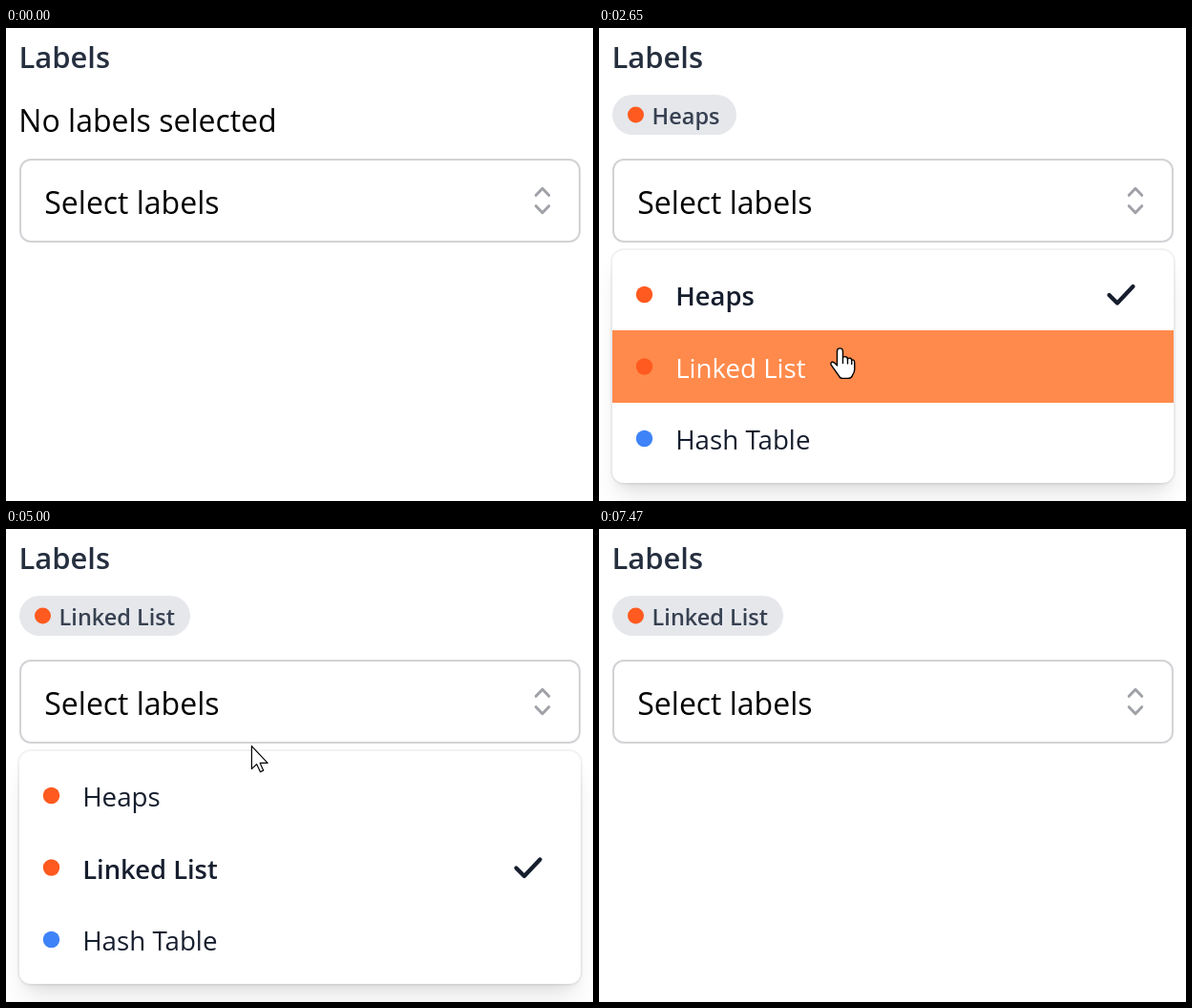
Animation of 615 by 496 pixels, one loop 8390 ms. Source, as an HTML page:

```html
<!DOCTYPE html>
<html lang="en">
<head>
<meta charset="utf-8">
<title>Label picker</title>
<style>
  html, body { margin: 0; width: 100%; height: 100%; overflow: hidden; background: #fff; }
  .box { position: absolute; left: 14px; width: 588px; box-sizing: border-box; background: #fff; border-radius: 12px; }
  #field { top: 137px; height: 88px; border: 2px solid #d2d3d6; }
  #menu {
    top: 233px; height: 244px;
    box-shadow: 0 0 0 2px rgba(0,0,0,.05), 0 19px 28px -6px rgba(0,0,0,.1), 0 8px 11px -4px rgba(0,0,0,.06);
  }
  svg { position: absolute; left: 0; top: 0; font-family: "Open Sans", "Noto Sans", sans-serif; }
  text { white-space: pre; }
</style>
</head>
<body>
<div class="box" id="field"></div>
<div class="box" id="menu"></div>
<svg id="stage" width="615" height="496" viewBox="0 0 615 496"></svg>
<script>
const LOOP = 8390, ROW_TOP = 241, ROW_H = 75.5;
const ORANGE = '#ff5a1f', INK = '#161e2e';
const stage = document.getElementById('stage');
const menu = document.getElementById('menu');

const labels = [
  { name: 'Heaps', color: ORANGE, chip: 130, on: [2180, 4280] },
  { name: 'Linked List', color: ORANGE, chip: 179, on: [3090, LOOP] },
  { name: 'Hash Table', color: '#3f83f8', chip: 178, on: [LOOP, LOOP] }
];

// Pointer moves: start, end, then three points of a quadratic curve
const moves = [
  [70, 870, 547, 495, 430, 340, 314, 189.5],
  [1370, 2140, 314, 189.5, 292, 232, 267, 268],
  [2240, 2780, 267, 268, 256, 310, 250, 352],
  [3750, 4040, 250, 352, 250, 318, 252, 285],
  [4850, 5360, 252, 285, 252, 165, 328, 90],
  [6280, 7120, 328, 90, 385, 232, 493, 394],
  [7120, 7470, 493, 394, 528, 445, 560, 497]
];

const ARROW = 'M.5 .5V24.5L5.8 19.6L9.6 27.6L12.8 26.2L9.3 18.4H17.2Z';
const HAND = 'M-3 3Q-3 0 0 0Q3 0 3 3V10Q3.4 8.6 5.5 8.7Q8 9 8 11.5Q8.3 10 10.3 10.2' +
  'Q12.3 10.5 12.3 13Q12.6 11.8 14 12.2Q15.3 12.6 15.3 15V22Q15.3 25 13.2 28' +
  'Q12 31.5 8 31.5H3Q0 31.5 -1 29Q-4 25 -6 22L-9.2 17.5Q-10.3 15 -8.3 14.3Q-6.2 14 -3 18Z' +
  'M3 10V16M8 11.5V16.5M12.3 13V17';

const clamp = v => Math.max(0, Math.min(1, v));
const text = (x, y, size, color, str, weight = 400) =>
  `<text x="${x}" y="${y}" font-size="${size}" fill="${color}" font-weight="${weight}">${str}</text>`;
const dot = (x, y, r, color) => `<circle cx="${x}" cy="${y}" r="${r}" fill="${color}"/>`;
const line = (d, color, width) =>
  `<path d="${d}" fill="none" stroke="${color}" stroke-width="${width}" stroke-linecap="round" stroke-linejoin="round"/>`;

function pointer(t) {
  if (t < 80 || t >= 7470) return null;
  const [start, end, ax, ay, bx, by, cx, cy] = moves.filter(m => t >= m[0]).pop();
  const u = clamp((t - start) / (end - start));
  const e = (u + u * u * (3 - 2 * u)) / 2;
  const curve = (a, b, c) => (1 - e) ** 2 * a + 2 * e * (1 - e) * b + e * e * c;
  return { x: curve(ax, bx, cx), y: curve(ay, by, cy) };
}

function isOn(label, t) {
  return t >= label.on[0] && t < label.on[1];
}

function drawChips(t) {
  let x = 14, out = '';
  for (const l of labels.filter(l => isOn(l, t))) {
    out += `<rect x="${x}" y="70" width="${l.chip}" height="42" rx="21" fill="#e5e7eb"/>` +
      dot(x + 24.5, 91, 8.5, l.color) + text(x + 41.6, 100.5, 23.5, '#374151', l.name, 600);
    x += l.chip + 8;
  }
  return out || text(13.3, 109, 32, '#000', 'No labels selected');
}

function drawRow(label, i, t, active) {
  const y = ROW_TOP + i * ROW_H, on = isOn(label, t), color = active ? '#fff' : INK;
  return (active ? `<rect x="14" y="${Math.ceil(y)}" width="588" height="76" fill="#ff8a4c"/>` : '') +
    dot(47.5, y + 38.5, 8.7, label.color) +
    text(80.2, y + 50, on ? 27.4 : 27.7, color, label.name, on ? 600 : 400) +
    (on ? line(`M534.5 ${y + 39}l8.5 8.5l16.5 -17.5`, color, 4.3) : '');
}

function draw(t) {
  const p = pointer(t);
  const open = t < 1040 ? 0 : clamp((5900 - t) / 50);
  const row = p && open ? Math.floor((p.y - ROW_TOP) / ROW_H) : -1;
  menu.style.opacity = open;

  let out = text(13.4, 42, 31, '#252f3f', 'Labels', 600) + drawChips(t) +
    text(40.3, 195, 32, '#000', 'Select labels') +
    line('M555.3 175.3L562 168.3L568.7 175.3M555.3 186.7L562 193.7L568.7 186.7', '#a0a2a8', 3);
  if (open) {
    out += `<g opacity="${open}">` + labels.map((l, i) => drawRow(l, i, t, i === row)).join('') + '</g>';
  }
  if (p) {
    const inField = p.x > 14 && p.x < 602 && p.y > 137 && p.y < 225;
    const hand = inField || (row >= 0 && row < labels.length);
    out += `<path transform="translate(${p.x} ${p.y})" d="${hand ? HAND : ARROW}" fill="#fff" ` +
      `stroke="#000" stroke-width="${hand ? 1.4 : 1.2}" stroke-linejoin="round"/>`;
  }
  stage.innerHTML = out;
}

const begin = performance.now();
function tick() {
  draw((performance.now() - begin) % LOOP);
  requestAnimationFrame(tick);
}
tick();
</script>
</body>
</html>
```
